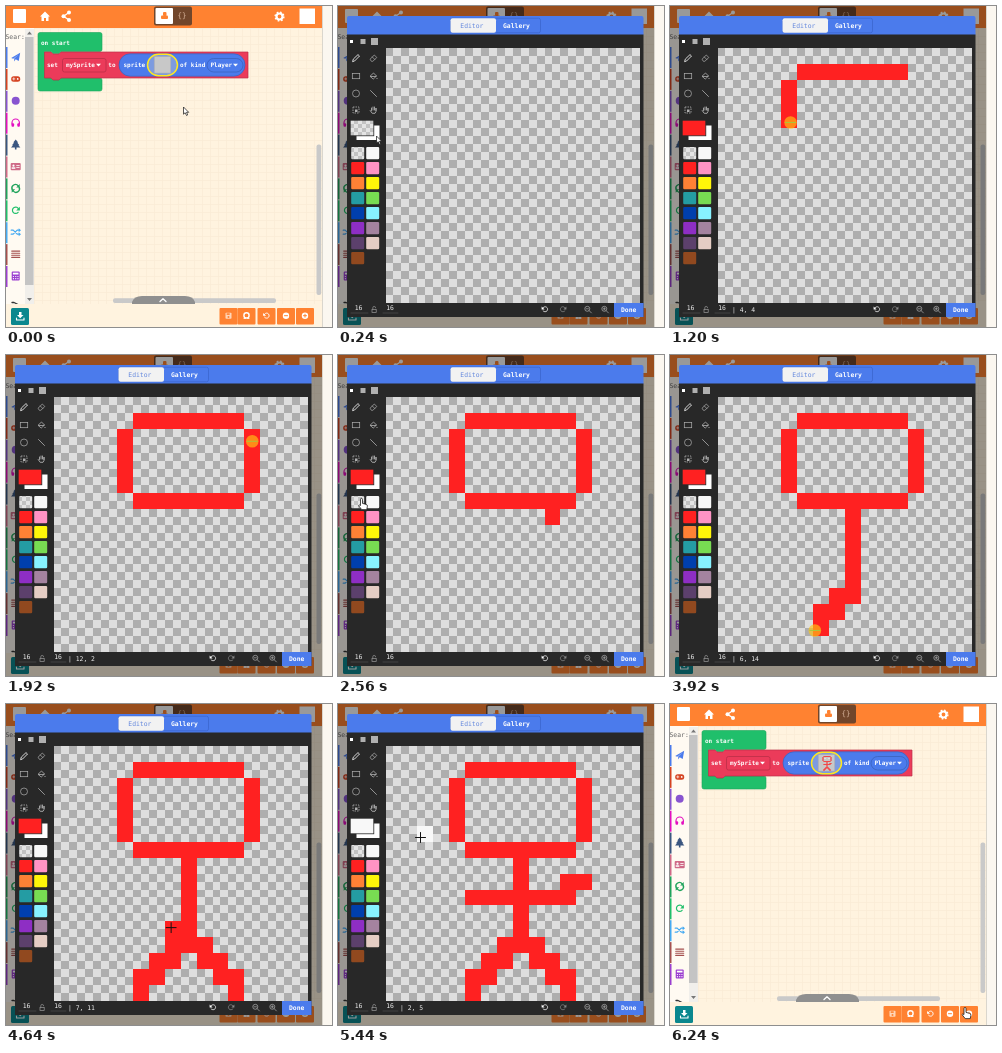
Recreate the animation shown at these times as an HTML page. Size 326 by 321 pixels, loop 6.32 s.

```html
<!DOCTYPE html>
<html lang="en">
<head>
<meta charset="utf-8">
<title>Sprite editor</title>
<style>
html, body { margin: 0; width: 100%; height: 100%; overflow: hidden; background: #fff3df; }
svg { display: block; width: 326px; height: 321px; }
text { font-family: "DejaVu Sans Mono", "Noto Sans Mono", monospace; white-space: pre; }
</style>
</head>
<body>
<svg id="stage" viewBox="0 0 326 321"></svg>
<script>
const LOOP = 6320, STEP = 80, OPEN = 160, CLOSE = 6240;
const CELL = 15.9, GX = 47.5, GY = 42.4;
const RED = '#ff2121', WHITE = '#f8f8f8', CLEAR = 'url(#small)';
const ORANGE = '#ff8231', BLUE = '#4b7bec';

const rect = (x, y, w, h, fill, more = '') =>
  `<rect x="${x}" y="${y}" width="${w}" height="${h}" fill="${fill}" ${more}/>`;
const text = (x, y, s, size = 6, fill = '#fff', more = 'font-weight="bold"') =>
  `<text x="${x}" y="${y}" font-size="${size}" fill="${fill}" ${more}>${s}</text>`;
const fillPath = (d, fill, more = '') => `<path d="${d}" fill="${fill}" ${more}/>`;
const line = (d, color, w = 1, more = '') =>
  `<path d="${d}" fill="none" stroke="${color}" stroke-width="${w}" stroke-linecap="round" stroke-linejoin="round" ${more}/>`;
const dot = (x, y, r, fill, more = '') => `<circle cx="${x}" cy="${y}" r="${r}" fill="${fill}" ${more}/>`;
const at = (x, y, s, scale = 1) => `<g transform="translate(${x} ${y}) scale(${scale})">${s}</g>`;

const turn = (c, w = 1.2) => line('M-3-1A3.2 3.2 0 1 1-2.4 2', c, w) + fillPath('M-4.2-3.5v3.7h3.7z', c);
const flip = s => `<g transform="scale(-1 1)">${s}</g>`;
const lens = (c, plus) => dot(-.7, -.7, 2.5, 'none', `stroke="${c}" stroke-width=".7"`) +
  line('M1.2 1.2L3.4 3.4M-1.8-.7h2.2' + (plus ? 'M-.7-1.8v2.2' : ''), c, .7);
const drop = (x, y) => fillPath(`M${x} ${y}h5l-2.5 2.8z`, '#fff');

const defs = `<defs>
<pattern id="small" x="12" y="114" width="8" height="8" patternUnits="userSpaceOnUse">
${rect(0, 0, 8, 8, '#c2c2c2')}${rect(0, 0, 4, 4, '#e4e4e4')}${rect(4, 4, 4, 4, '#e4e4e4')}</pattern>
<pattern id="lines" x="28" y="22" width="8" height="8" patternUnits="userSpaceOnUse">
<path d="M0 .5H8M.5 0V8" stroke="#f9ebd6" stroke-width=".7"/></pattern></defs>`;

function checker() {
  const s = CELL / 2;
  let d = '';
  for (let y = 0; y < 32; y++)
    for (let x = y % 2; x < 32; x += 2) d += `M${GX + x * s} ${GY + y * s}h${s}v${s}h${-s}z`;
  return rect(GX, GY, CELL * 16, CELL * 16, '#dedede', 'shape-rendering="crispEdges"') +
    fillPath(d, '#aeaeae', 'shape-rendering="crispEdges"');
}

function header() {
  return rect(0, 0, 316, 22, ORANGE) +
    rect(7, 3, 13, 14, '#fff', 'rx="1"') +
    fillPath('M34 10.5l5-5 5 5h-1.5v4.5h-2.5v-3h-2v3h-2.5v-4.5z', '#fff') +
    line('M63 6.5L57.5 10.2 63 14', '#fff', 1.3) +
    dot(63, 6.5, 2, '#fff') + dot(57.5, 10.2, 2, '#fff') + dot(63, 14, 2, '#fff') +
    rect(148, .5, 38, 19, '#71462b', 'rx="2"') + rect(149.5, 2, 17.5, 16, '#fff', 'rx="1"') +
    rect(155, 9.5, 7, 3.5, ORANGE, 'rx="1"') + rect(157, 6, 3.5, 4, ORANGE, 'rx="1"') +
    text(171.5, 12, '{}', 7.5, '#d9b59c', '') +
    dot(273.5, 10.5, 3, 'none', 'stroke="#fff" stroke-width="2.2"') +
    dot(273.5, 10.5, 4.4, 'none', 'stroke="#fff" stroke-width="1.4" stroke-dasharray="1.7 1.756"') +
    rect(293.5, 2.5, 15.5, 15.5, '#fff');
}

function toolbox() {
  const loop = c => line('M-3.5 1A3.5 3.5 0 0 1 2.5-2.5M3.5-1A3.5 3.5 0 0 1-2.5 2.5', c, 1.4) +
    fillPath('M4-4.3v3.5h-3.5zM-4 4.3v-3.5h3.5z', c);
  const icons = [
    [BLUE, c => fillPath('M-4.5 1L4.5-4.3 3 4 0 2.2-1.5 4.5V1.5L3-2.5-2.5 1.8z', c)],
    ['#d54322', c => rect(-4.5, -2.7, 9, 5.5, c, 'rx="2.5"') + line('M-3 0h2.2M-1.9-1.1v2.2', '#fff', .7) + dot(2, 0, .9, '#fff')],
    ['#8854d0', c => dot(0, 0, 4, c)],
    ['#e30fc0', c => line('M-3.7 1V0a3.7 3.7 0 0 1 7.4 0v1', c, 1.2) + rect(-4.2, .5, 2.6, 3.5, c, 'rx="1"') + rect(1.6, .5, 2.6, 3.5, c, 'rx="1"')],
    ['#3b5680', c => fillPath('M0-5l2.5 3h-1l2.2 2.6h-1l2 2.4H.8V5H-.8V3H-4.7l2-2.4h-1l2.2-2.6h-1z', c)],
    ['#cf6a87', c => rect(-5, -3.5, 10, 7.2, c, 'rx="1"') + dot(-2.2, -.8, 1.1, '#fff') + rect(-4, .8, 3.6, 1.5, '#fff') + line('M1-1h2.5M1 1h2.5', '#fff', .8)],
    ['#20a35c', loop],
    ['#20bf6b', c => flip(turn(c))],
    ['#45aaf2', c => line('M-4.5-2h2l4 4h2M-4.5 2h2l4-4h2', c, 1.2) + fillPath('M3-4l2.3 2L3 0zM3 0l2.3 2L3 4z', c)],
    ['#a5504f', c => line('M-4-3h8M-4-.9h8M-4 1.2h8M-4 3.3h8', c, 1.1)],
    ['#9b3fd0', c => rect(-4, -4.5, 8, 9, c, 'rx="1"') + rect(-2.8, -3.3, 5.6, 1.8, '#fff') + line('M-2.3.5h.1M0 .5h.1M2.2.5h.1M-2.3 2.7h.1M0 2.7h.1M2.2 2.7h.1', '#fff', 1.2)]
  ];
  return rect(0, 22, 28, 276, '#fffaf2') + text(-.5, 33, 'Sear:', 6.4, '#666', '') +
    icons.map(([c, icon], i) => rect(0, 41 + i * 21.9, 1.5, 21, c) + at(9.7, 51 + i * 21.9, icon(c))).join('') +
    line('M6 296.5h2l4 2', '#333', 1.3) +
    rect(19, 23, 9, 275, '#f1efeb') + rect(19, 31, 8.5, 248, '#c4c4c4') +
    fillPath('M21 28.5l2.5-3 2.5 3zM21 292l2.5 3 2.5-3z', '#777');
}

function blocks() {
  return fillPath('M34 26.5h60q2 0 2 2v15q0 2-2 2H55l-2 2H47l-2-2H38.5V72H45l2 2h6l2-2h39q2 0 2 2v9q0 2-2 2H34q-2 0-2-2V28.5q0-2 2-2z', '#20bf6b', 'stroke="#1aa65c" stroke-width=".6"') +
    fillPath('M38.5 46H45l2 2h6l2-2H242V72H55l-2 2H47l-2-2H38.5z', '#eb3b5a', 'stroke="#bc2f48" stroke-width=".7"') +
    text(35, 39, 'on start') + text(41, 61, 'set') +
    rect(56.5, 52.5, 43.5, 13.5, '#eb3b5a', 'rx="2" stroke="#bc2f48" stroke-width=".8"') +
    text(60, 61, 'mySprite') + drop(90, 57.8) + text(102.3, 61, 'to') +
    rect(113, 47.8, 126, 22.4, BLUE, 'rx="11.2" stroke="#3c62bd" stroke-width=".7"') +
    text(117.5, 61, 'sprite') +
    rect(141.5, 48.3, 30, 21.4, '#7d9be0', 'rx="11" stroke="#ffe720" stroke-width="1.5"') +
    rect(148.2, 50.5, 16.6, 16.6, '#c8c8c8', 'stroke="#a5a8b0" stroke-width=".6"') +
    '<g id="thumb" transform="translate(148.5 51)"></g>' +
    text(174, 61, 'of kind') +
    rect(201, 52.5, 36, 13.5, BLUE, 'rx="6.7" stroke="#3c62bd" stroke-width=".8"') +
    text(204.5, 61, 'Player') + drop(227, 57.8);
}

function footer() {
  const buttons = [213.5, 231.5, 251.5, 271, 290];
  const ring = plus => dot(0, 0, 3.2, '#fff') + line('M-1.5 0h3' + (plus ? 'M0-1.5v3' : ''), ORANGE, 1);
  const signs = [
    rect(-3, -3, 6, 6, '#ffd5b8', 'rx=".7"') + rect(-1.8, -2.4, 3, 1.6, ORANGE) + dot(0, 1.3, 1, ORANGE),
    dot(0, -.3, 2.6, 'none', 'stroke="#fff" stroke-width="1.4"') + line('M-2.5 2.7h1.5M1 2.7h1.5', '#fff', 1),
    at(0, 0, turn('#fff'), .8), ring(false), ring(true)];
  return rect(310.5, 138.5, 4.7, 150.5, '#c9c9c9', 'rx="2"') + rect(107, 292.3, 163, 4.7, '#c9c9c9', 'rx="2"') +
    rect(0, 298, 316, 23, '#fff3df') +
    fillPath('M126 298v-2q2-6 10-6h43q8 0 10 6v2z', '#8f8f8f') + line('M154 295.5l3-2.7 3 2.7', '#fff', 1.3) +
    rect(5, 302, 18, 17, '#0b878e', 'rx="1.5"') +
    fillPath('M13 306h2.5v3h2L14.2 312.2 11 309h2z', '#fff') + line('M10.5 312v2h7.5v-2', '#fff', 1.1) +
    buttons.map((x, i) => rect(x, 302, 18, 16.5, ORANGE, 'rx="1"') + at(x + 9, 309.7, signs[i])).join('');
}

function dialog() {
  const grey = '#b0b0b0';
  const tools = [
    line('M-3.3 3.3l.6-2.2L2-3.4 3.5-2-1.1 2.7z', '#fff', .8),
    line('M-3.2 1L.8-3 3.3-.5-.7 3.3H-1.7zM-1.2-1L1.3 1.5', grey, .7),
    rect(-3.7, -2.5, 7.4, 5.2, 'none', `stroke="${grey}" stroke-width=".7"`),
    line('M-3.2 0L0-3 3 0 0 2.8zM-2.8.5h5.4', grey, .8) + dot(3.5, 2.5, .6, grey),
    dot(0, 0, 3.5, 'none', `stroke="${grey}" stroke-width=".7"`),
    line('M-3-3L3 3', grey, .8),
    rect(-3, -3, 6, 6, 'none', `stroke="${grey}" stroke-width=".8" stroke-dasharray="1.5 1"`) + rect(-1, -.5, 2.5, 2.5, grey),
    line('M-2 .5V-2M-.5 0V-3M1 0V-3M2.5.5V-2V1.5L1.5 3.3H-1.3L-3.3.5', grey, .9)];
  const palette = [CLEAR, WHITE, RED, '#ff93c4', '#ff8135', '#fff609', '#249ca3', '#78dc52',
    '#003fad', '#87f2ff', '#8e2ec4', '#a4839f', '#5c406c', '#e5cdc4', '#91491f'];
  const toolY = [52, 70, 87.5, 104];
  return rect(0, 0, 316, 321, '#000', 'opacity=".4"') +
    fillPath('M9 29V12q0-2 2-2H303.5q2 0 2 2V29z', BLUE) + rect(9, 28.5, 296.5, 282.5, '#282828') +
    rect(112.5, 12.2, 90, 14.6, BLUE, 'rx="2" stroke="#3c66cf" stroke-width=".8"') +
    rect(112.5, 12.2, 45.5, 14.6, '#f2f2f2', 'rx="2"') +
    text(122.3, 22, 'Editor', 6.4, '#6488dd', '') + text(165, 22, 'Gallery', 6.4) +
    rect(12, 34, 3, 3, '#fff') + rect(22.5, 33, 5, 5, grey) + rect(33, 32, 7, 7, grey) +
    tools.map((s, i) => at(i % 2 ? 35.5 : 18, toolY[i >> 1], s)).join('') +
    rect(18.5, 119.5, 23, 14.5, '#fff') +
    rect(12.2, 114.2, 23.6, 15.6, CLEAR, 'id="ink" stroke="#282828" stroke-width=".8"') +
    palette.map((c, i) => rect(i % 2 ? 28.2 : 13.2, 140.9 + (i >> 1) * 15, 13, 12.4, c, 'rx="1.2"')).join('') +
    checker() +
    `<g id="art" transform="translate(${GX} ${GY}) scale(${CELL})" shape-rendering="crispEdges"></g>` +
    text(16.7, 304.3, '16', 6.4, '#eee', '') + text(48.2, 304.3, '16', 6.4, '#eee', '') +
    line('M13 307h17M45 307h15', '#555', .6) +
    rect(34, 303.5, 4.2, 3, 'none', 'stroke="#999" stroke-width=".7"') + line('M34.8 303v-1.2a1.4 1.4 0 0 1 2.8 0', '#999', .7) +
    '<text id="spot" x="62" y="306" font-size="6.4" fill="#eee"></text>' +
    at(207, 303.3, turn('#fff', .9), .8) + at(225, 303.3, flip(turn('#888', .9)), .8) +
    at(250, 303.5, lens(grey, false)) + at(267, 303.5, lens(grey, true)) +
    rect(276, 297, 29.5, 14, BLUE) + text(283, 306, 'Done', 6.4);
}

const pointers = {
  arrow: fillPath('M0 0v7.2l1.7-1.5 1.3 2.8 1.2-.6L3 5.3h2.2z', '#fff', 'stroke="#111" stroke-width=".7"'),
  hand: at(0, 0, fillPath('M-1.2-3.5q0-1 .8-1t.8 1V-.5l3 .8q1 .3.9 1.5L3.8 4.5H-.2L-2.8 1.3q.3-1 1.6-.1z', '#fff', 'stroke="#111" stroke-width=".6"'), 1.25),
  cross: line('M-5 0H5M0-5V5', '#111', 1),
  press: dot(0, 0, 6.3, '#ffc414', 'opacity=".65"') + line('M-5 0H5', '#a8c83c', 1)
};

document.getElementById('stage').innerHTML = defs +
  rect(0, 0, 326, 321, '#fff3df') + rect(28, 22, 288, 276, 'url(#lines)') +
  header() + blocks() + toolbox() + footer() +
  `<g id="dialog">${dialog()}</g>` +
  rect(316, 0, 10, 321, '#fbf7f0') + rect(316, 0, .8, 321, '#d2cdc5') +
  '<g id="pointer">' +
  Object.keys(pointers).map(k => `<g id="${k}">${pointers[k]}</g>`).join('') + '</g>';

// start, time per cell, colour, pointer offset, corners of the stroke
const strokes = [
  [795, 45, RED, 1.5, 2.5, [[11, 1], [5, 1], [4, 2], [4, 5], [5, 6], [11, 6]]],
  [1760, 60, RED, 0, 0, [[12, 5], [12, 2]]],
  [2160, 60, RED, 0, 0, [[10, 7]]],
  [2900, 60, null, 0, 0, [[10, 7]]],
  [3470, 50, RED, -6, 2.5, [[8, 7], [8, 12], [7, 12], [7, 13], [6, 13], [6, 14], [5, 14], [5, 15]]],
  [4240, 50, RED, 0, 0, [[9, 12], [9, 13], [10, 13], [10, 14], [11, 14], [11, 15]]],
  [4700, 45, RED, 0, 0, [[5, 9], [11, 9], [11, 8], [12, 8]]],
  [5640, 60, WHITE, 0, 0, [[6, 3]]],
  [5800, 60, WHITE, 0, 0, [[10, 3]]]
];
const moves = [
  [0, 177.5, 101], [159, 177.5, 101], [160, 110, 92], [240, 38.5, 130], [440, 20, 163], [520, 20, 163],
  [2560, 24, 149], [2680, 24, 149], [3160, 20, 163], [3240, 20, 163],
  [5240, 35, 148], [5300, 35, 148], [5440, 82.5, 133.5],
  [6040, 290, 304], [6239, 290, 304], [6240, 295.5, 309]
];
const inks = [[0, CLEAR], [480, RED], [2640, CLEAR], [3200, RED], [5280, WHITE]];

const dabs = [], presses = [];
for (const [start, gap, color, dx, dy, pts] of strokes) {
  let [x, y] = pts[0], t = start;
  const dab = () => {
    dabs.push([t, x, y, color]);
    moves.push([t, GX + (x + .5) * CELL + dx, GY + (y + .5) * CELL + dy]);
  };
  dab();
  for (const [px, py] of pts.slice(1)) {
    while (x !== px || y !== py) {
      x += Math.sign(px - x);
      y += Math.sign(py - y);
      t += gap;
      dab();
    }
  }
  moves.push([t + gap, ...moves[moves.length - 1].slice(1)]);
  presses.push([start, t + gap]);
}
moves.sort((a, b) => a[0] - b[0]);

function pointerAt(t) {
  const i = moves.findIndex(m => m[0] > t);
  if (i < 0) return moves[moves.length - 1].slice(1);
  const [t0, x0, y0] = moves[i - 1], [t1, x1, y1] = moves[i];
  const k = (t - t0) / (t1 - t0), e = k * k * (3 - 2 * k);
  return [x0 + (x1 - x0) * e, y0 + (y1 - y0) * e];
}

function artAt(t) {
  const cells = new Map();
  for (const [time, x, y, color] of dabs) if (time <= t) cells.set(x + ',' + y, [x, y, color]);
  return [...cells.values()].filter(c => c[2]).map(([x, y, c]) => rect(x, y, 1, 1, c)).join('');
}

const $ = id => document.getElementById(id);
const show = (id, on) => $(id).setAttribute('display', on ? 'inline' : 'none');

function draw(t) {
  const open = t >= OPEN && t < CLOSE, [x, y] = pointerAt(t);
  const cx = Math.floor((x - GX) / CELL), cy = Math.floor((y - GY) / CELL);
  const inside = open && cx >= 0 && cx < 16 && cy >= 0 && cy < 16;
  const ink = inks.filter(i => i[0] <= t).pop()[1];
  const art = artAt(t);
  show('dialog', open);
  $('ink').setAttribute('fill', ink);
  $('art').innerHTML = art + (inside && ink !== CLEAR ? rect(cx, cy, 1, 1, ink) : '');
  $('thumb').innerHTML = t >= CLOSE ? art : '';
  $('spot').textContent = inside ? `| ${cx}, ${cy}` : '';
  const onSwatch = x > 13 && x < 42 && y > 140 && y < 260, onButton = x > 276 && y > 297;
  const pressed = presses.some(([a, b]) => t >= a && t < b);
  const kind = pressed ? 'press' : inside ? 'cross' : onSwatch || onButton ? 'hand' : 'arrow';
  for (const k in pointers) show(k, k === kind);
  $('pointer').setAttribute('transform', `translate(${x} ${y})`);
}

const begin = performance.now();
let last = -1;
function tick() {
  const t = Math.floor(((performance.now() - begin) % LOOP) / STEP) * STEP;
  if (t !== last) draw(last = t);
  requestAnimationFrame(tick);
}
tick();
</script>
</body>
</html>
```
